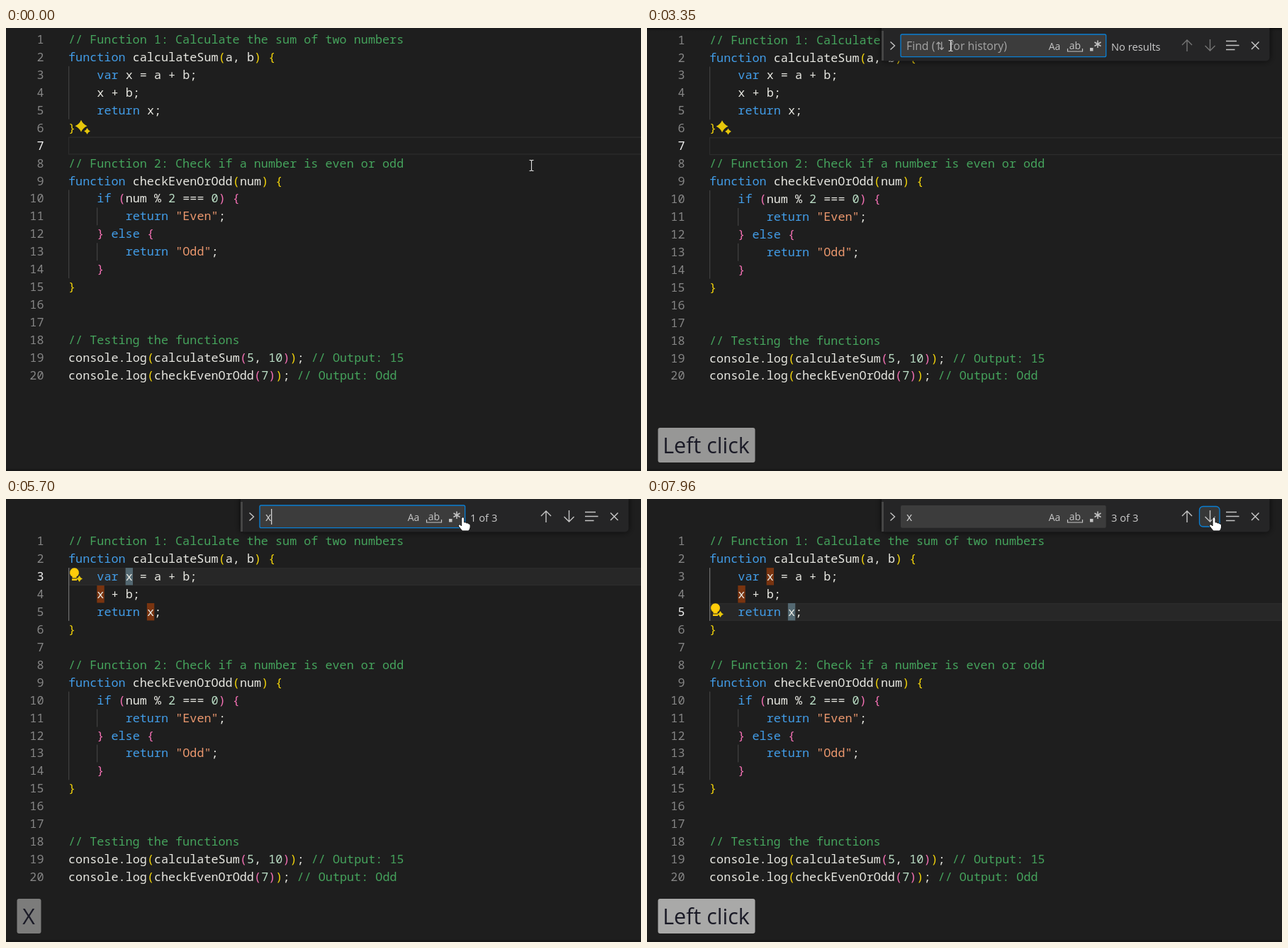
Recreate the animation shown at these times as an HTML page with a canvas. Size 896 px wide and 625 px high, loop 8000 ms.

```html
<!DOCTYPE html>
<html lang="en">
<head>
<meta charset="utf-8">
<title>Find in editor</title>
<style>
  html, body { margin: 0; width: 100%; height: 100%; overflow: hidden; background: #1e1e1e; }
  canvas { display: block; }
</style>
</head>
<body>
<canvas id="stage" width="896" height="625"></canvas>
<script>
const ctx = document.getElementById('stage').getContext('2d');
const LOOP = 8000, LINE = 24.94, CHAR = 10.08, LEFT = 88;
const MONO = '500 16.8px "Noto Sans Mono", monospace';
const ui = size => `${size}px "Open Sans", "DejaVu Sans", sans-serif`;

const CODE = `// Function 1: Calculate the sum of two numbers
function calculateSum(a, b) {
    var x = a + b;
    x + b;
    return x;
}

// Function 2: Check if a number is even or odd
function checkEvenOrOdd(num) {
    if (num % 2 === 0) {
        return "Even";
    } else {
        return "Odd";
    }
}


// Testing the functions
console.log(calculateSum(5, 10)); // Output: 15
console.log(checkEvenOrOdd(7)); // Output: Odd`.split('\n');

// Split the code into coloured tokens; brackets alternate by depth.
let depth = 0;
const tokens = CODE.map(line =>
  [...line.matchAll(/\/\/.*|"[^"]*"|\w+|[(){}]|[^\s\w]/g)].map(match => {
    const text = match[0];
    let color = '#e8e8e2';
    if (text.startsWith('//')) color = '#45a35c';
    else if (text[0] === '"') color = '#ec986e';
    else if (/^(function|var|return|if|else)$/.test(text)) color = '#429de8';
    else if (/^\d/.test(text)) color = '#b9dcc4';
    else if (/[({]/.test(text)) color = depth++ % 2 ? '#f571b5' : '#f5d60a';
    else if (/[)}]/.test(text)) color = --depth % 2 ? '#f571b5' : '#f5d60a';
    return { text, color, x: LEFT + match.index * CHAR };
  }));

const MATCHES = [[2, 8], [3, 4], [4, 11]];   // line, column of each "x"
const KEYS = [[590, 'CTRL', 86], [1000, 'CTRL+F', 122.5], [2600, 'Left click', 137],
              [4480, 'X', 34], [6810, 'Left click', 137], [7550, 'Left click', 137]];
const BLINKS = [1000, 1530, 2050, 2560, 2640, 3090, 3610, 4140, 4480, 4960, 5480, 6050, 6610, 6810];
const PATH = [[0, 742, 194], [1670, 742, 194], [1740, 718, 182], [1950, 560, 95], [2090, 463, 45],
              [2300, 433, 26], [2560, 433, 26], [2640, 429, 25], [5220, 429, 25], [5600, 600, 26],
              [5980, 768, 26], [6050, 781, 26], [6330, 787, 26], [6470, 800, 26], [8000, 800, 26]];

function rect(x, y, w, h, color) {
  ctx.fillStyle = color;
  ctx.fillRect(x, y, w, h);
}
function box(x, y, w, h, r, fill, border) {
  ctx.beginPath();
  ctx.roundRect(x, y, w, h, r);
  if (fill) { ctx.fillStyle = fill; ctx.fill(); }
  if (border) { ctx.strokeStyle = border; ctx.lineWidth = 1.3; ctx.stroke(); }
}
function text(str, x, y, font, color, align = 'left') {
  ctx.font = font;
  ctx.fillStyle = color;
  ctx.textAlign = align;
  ctx.fillText(str, x, y);
}
function stroke(d, color, width = 1.4) {
  ctx.strokeStyle = color;
  ctx.lineWidth = width;
  ctx.stroke(new Path2D(d));
}
function shape(d, x, y, fill, border) {
  const path = new Path2D(d);
  ctx.save();
  ctx.translate(x, y);
  ctx.fillStyle = fill;
  ctx.fill(path);
  if (border) { ctx.strokeStyle = border; ctx.lineWidth = 1; ctx.stroke(path); }
  ctx.restore();
}
function star(x, y, r) {
  const k = r * 0.3;
  shape(`M0 ${-r}Q${k} ${-k} ${r} 0Q${k} ${k} 0 ${r}Q${-k} ${k} ${-r} 0Q${-k} ${-k} 0 ${-r}Z`, x, y, '#e6c60a');
}
function bulb(top) {
  shape('M-3.5 11V8.5H3.5V11ZM-3 5.5A6.5 6.5 0 1 1 3 5.5V7.5H-3Z', 96.5, top + 7, '#ffcc0a');
  star(103.5, top + 15.5, 4.5);
}

function drawCode(t, found) {
  const base = found ? 47.2 : t >= 1000 ? 4.6 : 4;
  const top = line => base + line * LINE;
  const active = found ? MATCHES[found - 1][0] : 6;

  if (found) rect(LEFT, top(active), 808, LINE, '#272727');
  ctx.strokeStyle = '#2c2c2c';
  ctx.lineWidth = 1.3;
  ctx.strokeRect(LEFT + .5, top(active) + .6, 820, LINE - 1.2);

  for (const [x, line, count] of [[88, 2, 3], [88, 9, 5], [128, 10, 1], [128, 12, 1]])
    rect(x, top(line), 1.2, count * LINE, found && line === 2 ? '#707070' : '#404040');

  if (found) MATCHES.forEach(([line, col], i) =>
    rect(LEFT + col * CHAR, top(line), CHAR + .3, LINE - .5, i === found - 1 ? '#536871' : '#793410'));

  tokens.forEach((row, i) => {
    const y = top(i) + 18;
    text(i + 1, 53.5, y, MONO, i === active ? '#f0f0f0' : '#858585', 'right');
    for (const token of row) text(token.text, token.x, y, MONO, token.color);
  });

  if (!found) {
    star(106, top(5) + 9.5, 8.5);
    star(114.5, top(5) + 16.8, 4.4);
    if (t >= 130 && t < 590) rect(LEFT, top(6), 2, LINE, '#d0d0d0');
  } else {
    const bulbLine = t >= 7960 ? 4 : t >= 7300 ? 3 : t >= 4740 && t < 6950 ? 2 : -1;
    if (bulbLine > 0) bulb(top(bulbLine));
  }
  if (t >= 1000 && !found) {
    const shade = ctx.createLinearGradient(0, 0, 0, 5);
    shade.addColorStop(0, '#0a0a0a');
    shade.addColorStop(1, '#1e1e1e00');
    rect(0, 0, 896, 5, shade);
  }
}

function drawFind(t, found, pointer) {
  if (t < 1000) return;
  const icon = '#c5c5c5', nav = found ? icon : '#757575';
  const focused = t < 6810;
  ctx.save();
  ctx.translate(0, -47 * (1 - Math.min(1, (t - 990) / 200)));

  ctx.save();
  ctx.shadowColor = '#000000b0';
  ctx.shadowBlur = 10;
  box(331, -8, 547.5, 54.5, 5, '#252526');
  ctx.restore();
  rect(331, 4, 3, 42, '#454545');

  stroke('M343.5 19.5L349.5 25L343.5 30.5', icon);
  box(358, 9, 289.7, 31.7, 2, '#3c3c3c', focused && '#0a7fd4');
  if (t >= 4480) text('x', 366, 31, ui(15.8), '#d4d4d4');
  else {
    text('Find (', 366, 31, ui(15.8), '#a6a6a6');
    text('⇅', 407, 31, ui(15.8), '#a6a6a6');
    text('for history)', 427, 31, ui(15.8), '#a6a6a6');
  }
  if (BLINKS.filter(time => time <= t).length % 2)
    rect(t >= 4480 ? 374 : 366, 14, 1.3, 22, '#d0d0d0');

  text('Aa', 575, 30.5, ui(14), icon, 'center');
  text('ab', 604, 29.5, ui(14), icon, 'center');
  stroke('M593.5 29V33H614.5V29', icon, 1.2);
  rect(625, 28, 4.5, 4.5, icon);
  stroke('M636 17.5V28M631.5 20L640.5 25.5M640.5 20L631.5 25.5', icon, 1.5);
  text(found ? found + ' of 3' : 'No results', 655, 32, ui(14.7), '#cccccc');

  for (const x of [747.5, 779.5])
    if (pointer.x >= x && pointer.x < x + 30 && pointer.y < 40)
      box(x, 10.5, 28.5, 28.5, 5, '#363737', !focused && x > 770 && '#0a7fd4');
  stroke('M762 33V17M755 24L762 17L769 24', nav);
  stroke('M794.5 16V32M787.5 25L794.5 32L801.5 25', nav);
  stroke('M817 18.5H832M817 24.5H835.5M817 30.5H829.5', icon, 1.7);
  stroke('M853 19.5L863.5 30M863.5 19.5L853 30', icon, 1.5);
  ctx.restore();
}

function pointerAt(t) {
  const i = PATH.findIndex(point => point[0] > t);
  const [t0, x0, y0] = PATH[i - 1], [t1, x1, y1] = PATH[i];
  const k = (t - t0) / (t1 - t0);
  return { x: x0 + (x1 - x0) * k, y: y0 + (y1 - y0) * k };
}

function drawPointer({ x, y }) {
  const overFind = x > 331 && y < 47;
  if (overFind && ((x > 563 && x < 648) || x > 747)) {
    shape('M-2 1Q0 -2 2 1V7Q4.5 6 5 8Q7.5 7 8 9Q10.5 8.5 10.5 11V14Q10 17 8 19H-1Q-4 15 -6.5 12Q-6.5 9 -4 10L-2 12Z',
      x, y, '#ffffff', '#111111');
  } else if (overFind && (y > 41 || x > 648)) {
    shape('M0 0V15L3.5 11.8L5.8 17L8 16L5.7 11H10.5Z', x, y, '#ffffff', '#111111');
  } else {
    ctx.save();
    ctx.translate(Math.round(x) - .5, Math.round(y));
    stroke('M-3 -7.5H-1L0 -6.5L1 -7.5H3M0 -6.5V6.5M-3 7.5H-1L0 6.5L1 7.5H3', '#e0e0e0', 1.1);
    ctx.restore();
  }
}

function drawKey(t) {
  const key = KEYS.findLast(entry => entry[0] <= t);
  if (!key) return;
  const [start, label, width] = key;
  const alpha = Math.max(0, 0.96 - (t - start) * 0.00033);
  box(15.5, 564, width, 49, 3, `rgba(200,200,198,${alpha})`);
  text(label, 15 + width / 2, 599.5, ui(30.5), '#1a1a26', 'center');
}

function draw(now) {
  const t = now % LOOP;
  const found = t < 4550 ? 0 : t < 6950 ? 1 : t < 7620 ? 2 : 3;
  const pointer = pointerAt(t);
  rect(0, 0, 896, 625, '#1e1e1e');
  drawCode(t, found);
  rect(0, 622, 896, 3, '#181818');
  drawFind(t, found, pointer);
  drawKey(t);
  drawPointer(pointer);
}

const begin = performance.now();
function tick() {
  draw(performance.now() - begin);
  requestAnimationFrame(tick);
}
tick();
</script>
</body>
</html>
```
